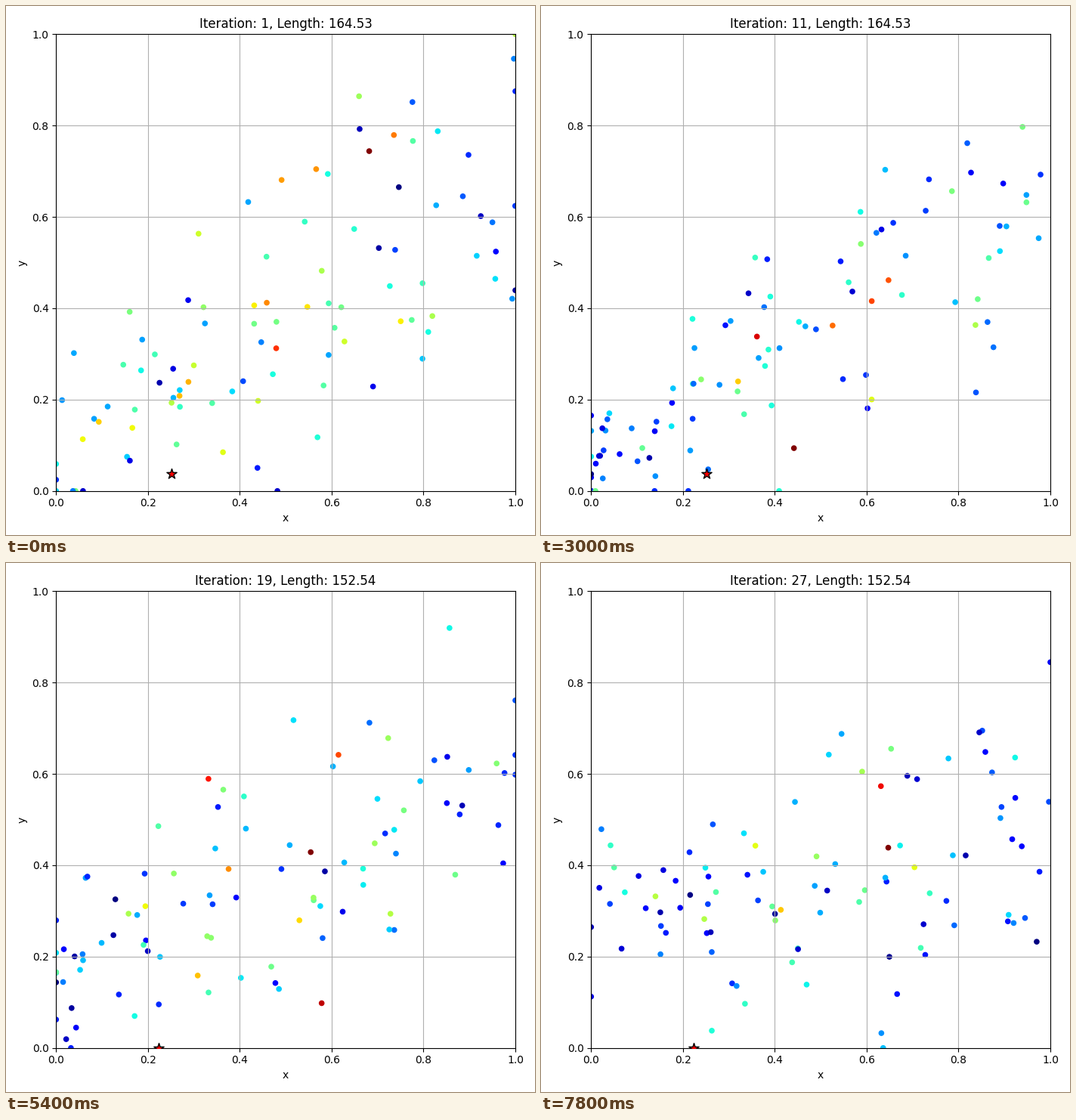
A matplotlib script for the animation above (8 s loop, 700 px wide and 700 px high).

```python
import matplotlib.pyplot as plt
import numpy as np
from matplotlib.animation import FuncAnimation

STEPS_PER_ITERATION = 3
N_STEPS = 80
N_PARTICLES = 98
LAST_ITERATION = 1 + (N_STEPS - 1) // STEPS_PER_ITERATION
IMPROVED_AT = 12

rng = np.random.default_rng(12)
rank = (np.arange(N_PARTICLES) + rng.random(N_PARTICLES)) / N_PARTICLES
amp_cos, amp_sin = rng.normal(size=(2, 3, N_PARTICLES))
speed = rng.uniform(0.15, 0.4, (3, N_PARTICLES))


def smoothstep(value, start, end):
    u = np.clip((value - start) / (end - start), 0, 1)
    return u * u * (3 - 2 * u)


def particles(iteration):
    """Swarm along a rising band that crowds one corner, then flattens."""
    phase = speed * iteration
    drift_x, drift_y, drift_c = amp_cos * np.cos(phase) + amp_sin * np.sin(phase)
    arc = np.sin(np.pi * (iteration - 1) / (LAST_ITERATION - 1))
    flat = smoothstep(iteration, 17, 21)

    x = 1.02 * rank ** (1 + 0.4 * arc) - 0.01 + 0.06 * drift_x
    x = np.clip(x, 0, 1)
    level = 0.07 + 0.19 * flat
    slope = 0.60 - 0.38 * flat
    spread = (0.19 - 0.04 * arc) * (0.6 + 0.4 * x)
    y = np.clip(level + slope * x + spread * drift_y, 0, 1)

    # Cold at both ends of the band, with a thin tail of hot particles
    warmth = (0.3 + 0.15 * arc) * np.sin(np.pi * x)
    cost = np.exp(warmth + 0.3 * drift_c)
    return x, y, cost


def best(iteration):
    if iteration < IMPROVED_AT:
        return (0.252, 0.038), 164.53
    return (0.224, 0.0), 152.54


fig, ax = plt.subplots(figsize=(7, 7), dpi=100)
x, y, cost = particles(1)
dots = ax.scatter(x, y, c=cost, s=20, cmap="jet")
star = ax.scatter(0, 0, s=100, c="red", marker="*", edgecolors="black",
                  linewidths=1, zorder=3)
ax.set(xlim=(0, 1), ylim=(0, 1), xlabel="x", ylabel="y")
title = ax.set_title("Iteration: 1, Length: 164.53")
ax.grid(True)
fig.tight_layout()


def update(step):
    iteration = 1 + step // STEPS_PER_ITERATION
    x, y, cost = particles(iteration)
    dots.set_offsets(np.column_stack([x, y]))
    dots.set_array(cost)
    dots.set_clim(cost.min(), cost.max())
    position, length = best(iteration)
    star.set_offsets([position])
    title.set_text(f"Iteration: {iteration}, Length: {length:.2f}")
    return dots, star, title


anim = FuncAnimation(fig, update, frames=N_STEPS, interval=100,
                     repeat=True, repeat_delay=0, blit=False)
plt.show()
```
